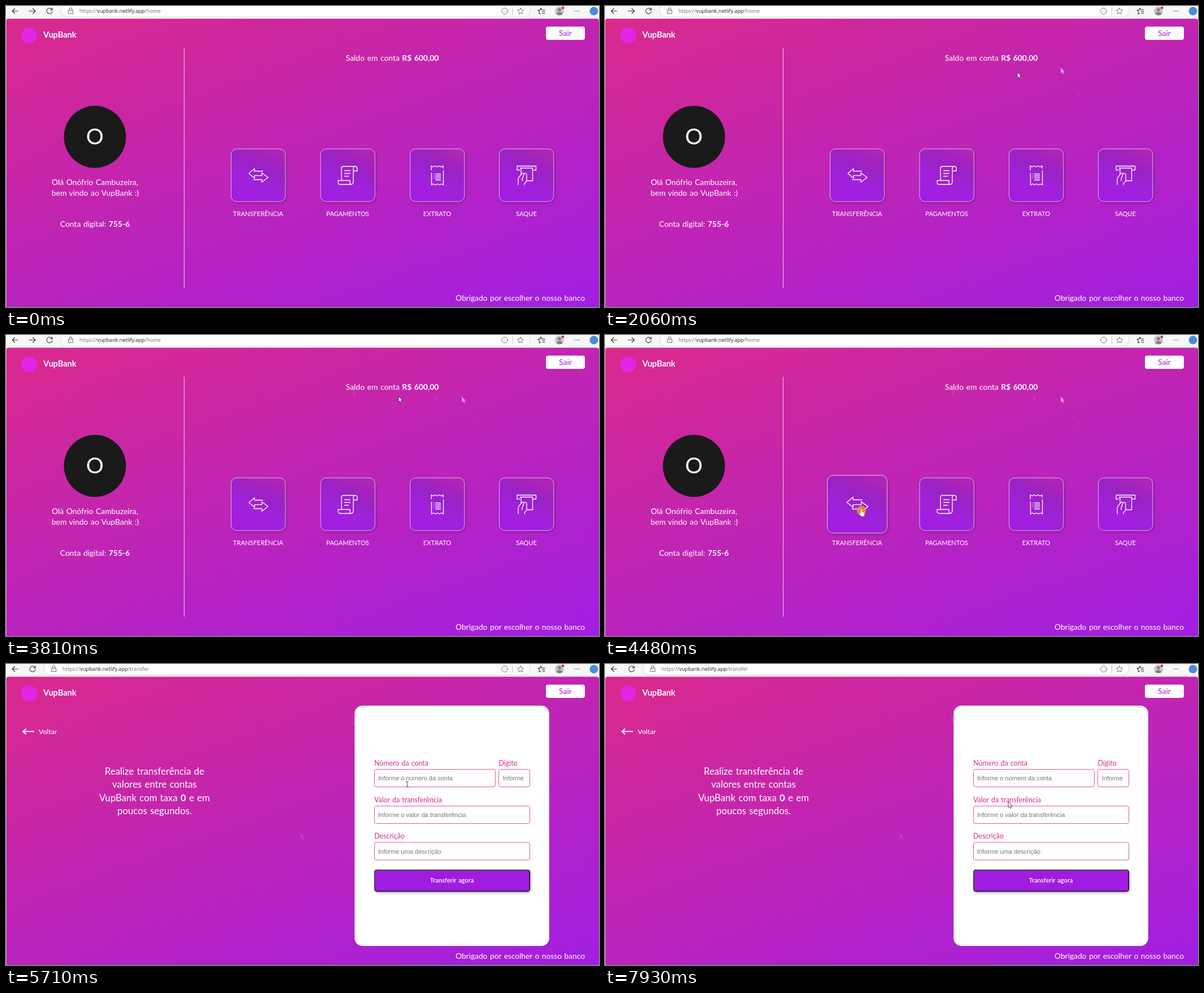
An HTML page that plays this animation: 1050 by 533 pixels, repeating every 8000 ms.

```html
<!DOCTYPE html>
<html lang="pt-BR">
<head>
<meta charset="utf-8">
<title>VupBank</title>
<style>
html, body { margin: 0; width: 100%; height: 100%; overflow: hidden; background: #f7f7f7; }
svg { display: block; width: 100%; height: 100%; }
text { font-family: Lato, sans-serif; fill: #fff; word-spacing: 1px; white-space: pre; }
.mid { text-anchor: middle; }
.b { font-weight: 700; }
.label text { font-size: 12.4px; fill: #d62a8e; }
.hint text { font: 11px "Liberation Sans", Arial, sans-serif; fill: #757575; word-spacing: 0; }
.field rect { fill: #fff; stroke: #e0569f; rx: 3px; }
.url { font: 9.2px "Open Sans", sans-serif; fill: #6b6b78; word-spacing: 0; }
.bar { fill: none; stroke: #333; stroke-width: 1.1; stroke-linecap: round; stroke-linejoin: round; }
.icon { fill: none; stroke: #fff; stroke-width: 1.3; stroke-linejoin: round; }
</style>
</head>
<body>
<svg viewBox="0 0 1050 533" xmlns="http://www.w3.org/2000/svg">
  <defs>
    <linearGradient id="bg" gradientUnits="userSpaceOnUse" x1="382" y1="-116" x2="668" y2="672">
      <stop stop-color="#da298c"/><stop offset="1" stop-color="#a11fe3"/>
    </linearGradient>
    <linearGradient id="tile" x1=".25" y1="1" x2=".7" y2="0">
      <stop stop-color="#a21fe2"/><stop offset=".4" stop-color="#a020da"/>
      <stop offset=".64" stop-color="#9923c6"/><stop offset="1" stop-color="#ae25b6"/>
    </linearGradient>
    <filter id="soft" x="-20%" y="-20%" width="140%" height="150%">
      <feDropShadow dx="1.5" dy="2" stdDeviation="2" flood-opacity=".3"/>
    </filter>
    <path id="arrow" d="M0 0V10L2.3 8L4 11.6L5.7 10.8L4.1 7.3H7Z"/>
    <path id="beam" d="M-2.5-5H-.6L0-4.4L.6-5H2.5M0-4.4V4.4M-2.5 5H-.6L0 4.4L.6 5H2.5" fill="none"/>
    <path id="hand" d="M-1 0Q0-1 1 0V4.5L4.5 5.3Q6 5.8 5.6 7.5L4.6 12H-.8L-3.6 7.6Q-3.4 6-1 7Z"/>
  </defs>

  <!-- browser bar -->
  <g class="bar">
    <path d="M21 9H11M15.5 4.5L11 9L15.5 13.5"/>
    <path id="next" d="M41 9H52M47.5 4.5L52 9L47.5 13.5"/>
    <g id="reload"><path d="M81.5 6.5A5 5 0 1 0 82 9.5M82 3.5V7H78.5"/></g>
    <rect id="pill" y="-4" height="23.5" rx="11" fill="#fff" stroke="#dcdcdc"/>
    <g id="address">
      <path d="M110.5 7.5H118.5V13.5H110.5ZM112.3 7.5V5.5a2.2 2.2 0 0 1 4.4 0V7.5M114.5 10.2V10.8" stroke="#777"/>
      <text class="url" x="130" y="12" stroke="none">https://<tspan fill="#1c1c1c">vupbank.netlify.app</tspan><tspan id="path"></tspan></text>
    </g>
    <g stroke="#777" stroke-width="1">
      <circle cx="883" cy="9" r="5.3"/>
      <path d="M880.7 9h.1M883 9h.1M885.3 9h.1"/>
      <path d="M897.5 3V15" stroke="#bbb"/>
      <path d="M911 3.5l1.7 3.5 3.8.5-2.8 2.7.7 3.8-3.4-1.8-3.4 1.8.7-3.8-2.8-2.7 3.8-.5z"/>
    </g>
    <path d="M946.5 13l-2.5 1 .6-3.8-2.6-2.6 3.6-.5 1.6-3.4 1.6 3.2M950 7h4M949 10h5M950 13h4"/>
    <g stroke="none">
      <circle cx="980" cy="9" r="8" fill="#c9c7c5"/>
      <circle cx="980" cy="6.8" r="3" fill="#85827f"/>
      <path d="M974.5 14.5Q975 10.8 980 10.8T985.5 14.5Q980 18 974.5 14.5" fill="#85827f"/>
      <circle cx="986" cy="3.2" r="2.3" fill="#d9226e"/>
      <circle cx="1041" cy="9" r="7.5" fill="#4a8bdc"/>
    </g>
    <path d="M1007.5 9h.1M1011 9h.1M1014.5 9h.1" stroke-width="1.6"/>
  </g>

  <!-- shared page frame -->
  <path d="M.5 533V26.5Q.5 22.5 4.5 22.5H1046Q1050 22.5 1050 26.5V533Z" fill="url(#bg)"/>
  <circle cx="41" cy="52" r="14" fill="#e226e6"/>
  <text class="b" x="66" y="56" font-size="14.6">VupBank</text>
  <rect x="956" y="36.5" width="69" height="23.5" rx="4" fill="#fff"/>
  <text class="mid" x="990.5" y="52.5" font-size="14" style="fill:#a11fe0">Sair</text>
  <text x="1025" y="522" font-size="13.75" text-anchor="end">Obrigado por escolher o nosso banco</text>

  <g id="home">
    <path d="M315.5 74V499" stroke="#fff" stroke-opacity=".75"/>
    <circle cx="157.5" cy="231.7" r="55" fill="#1a1a1a"/>
    <g class="mid" font-size="13.9">
      <text x="157.3" y="245" font-size="39">O</text>
      <text x="157.5" y="317">Olá Onófrio Cambuzeira,</text>
      <text x="158" y="336">bem vindo ao VupBank :)</text>
      <text x="157.5" y="390.5">Conta digital: <tspan class="b">755-6</tspan></text>
      <text x="684" y="96.5">Saldo em conta <tspan class="b">R$ 600,00</tspan></text>
    </g>
    <g id="cards"></g>
  </g>

  <g id="ghosts" fill="#fff"></g>

  <g id="transfer">
    <path d="M49 119.5H30M35 115L30 119.5L35 124" fill="none" stroke="#fff" stroke-width="1.8" stroke-linecap="round"/>
    <text x="58" y="123.5" font-size="12.2" font-weight="500">Voltar</text>
    <g class="mid" font-size="16.8">
      <text x="263" y="196">Realize transferência de</text>
      <text x="263" y="219.3">valores entre contas</text>
      <text x="263" y="242.5">VupBank com taxa <tspan class="b">0</tspan> e em</text>
      <text x="263" y="265.5">poucos segundos.</text>
    </g>
    <rect x="617.3" y="73.7" width="344.5" height="425.6" rx="14" fill="#fff"/>
    <g class="label">
      <text x="652" y="179.5">Número da conta</text><text x="872.5" y="179.5">Dígito</text>
      <text x="652" y="244.5">Valor da transferência</text><text x="652" y="309">Descrição</text>
    </g>
    <g class="field">
      <rect x="652.5" y="186.5" width="214" height="31"/><rect x="872.5" y="186.5" width="55" height="31"/>
      <rect x="652.5" y="251.5" width="275" height="31"/><rect x="652.5" y="316" width="275" height="31"/>
    </g>
    <g class="hint">
      <text x="659" y="206">Informe o número da conta</text><text x="879.5" y="206">Informe</text>
      <text x="659" y="270.5">Informe o valor da transferência</text>
      <text x="659" y="335.5">Informe uma descrição</text>
    </g>
    <g filter="url(#soft)">
      <rect x="652.7" y="364.7" width="274.6" height="37.8" rx="4" fill="#a21fe0" stroke="#111" stroke-width="1.5"/>
      <path d="M652.7 400V369Q652.7 364.7 657 364.7H925" fill="none" stroke="#4c4c4c" stroke-width="1.5"/>
    </g>
    <text class="mid" x="789.5" y="387.3" font-size="11.1" font-weight="600">Transferir agora</text>
  </g>

  <circle id="click" cx="454" cy="310.5" r="8.3" fill="#eda31c" fill-opacity=".78"/>
  <use id="cursor"/>
</svg>

<script>
const $ = id => document.getElementById(id);
const LOOP = 8000, OPEN = 4620, ROUTE = 4700;

// centre x, caption, icon outline
const cards = [
  [446.5, "TRANSFERÊNCIA", "M455 292.5H440V288L430 296.5L440 305V300.3H453V295.5L464 303.5L453 312V307.5H438"],
  [605, "PAGAMENTOS", "M594 308V288q0-4 4-4h20q4 0 4 4v4h-6M618 284q-3 0-3 4v23q0 5-5 5h-18q-4 0-4-4v-3h21v3q0 4 3 4M599 291.5h11M599 296.5h11M599 301.5h8"],
  [763.5, "EXTRATO", "M753 291v-8l3.5 2 3.5-2 3.5 2 3.5-2 3.5 2 3.5-2v5M774.5 291v26l-3.5-2-3.5 2-3.5-2-3.5 2-3.5-2-3.5 2v-22M757 297.5h1M760 297.5h10M757 301h1M760 301h10M757 304.5h1M760 304.5h10M760 308h10"],
  [921.5, "SAQUE", "M910 290.5h-5v-7h33.5v7h-5M910 287h23M912 287v11M932.5 287v22.5h-11M907 317v-10q0-3 2-5l5-6q3-1 3 2l-3 8v4M917 297l3-1q2 1 2 3v9q0 4-4 6v3"]
];
$("cards").innerHTML = cards.map(([x, name, icon], i) => `
  <g id="card${i}">
    <rect x="${x - 48}" y="253" width="96.3" height="93.3" rx="10" fill="url(#tile)" filter="url(#soft)"/>
    <rect x="${x - 48}" y="253" width="96.3" height="93.3" rx="10" fill="none" stroke="#fff" stroke-opacity=".75" stroke-width=".9"/>
    <path class="icon" d="${icon}"/>
  </g>
  <text class="mid" x="${x}" y="372" font-size="11.2">${name}</text>`).join("");

// faint trails the pointer leaves: shape, x, y, opacity, from, to
const ghosts = [
  ["arrow", 807, 109, .55, 1330, OPEN],
  ["arrow", 837, 151, .05, 1280, OPEN],
  ["arrow", 758, 107, .08, 2260, OPEN],
  ["beam", 616, 102, .22, 2750, OPEN],
  ["beam", 616, 102, .2, OPEN, LOOP],
  ["arrow", 522, 300, .12, 5200, LOOP]
];
$("ghosts").innerHTML = ghosts.map(([shape, x, y, o]) =>
  `<use href="#${shape}" x="${x}" y="${y}" opacity="${o}"${shape == "beam" ? ' stroke="#fff"' : ""}/>`).join("");

// pointer path: time, x, y
const track = [
  [790, 1000, 478], [1030, 920, 290], [1260, 837, 151], [1330, 807, 109], [1460, 770, 84], [1590, 747, 88],
  [1840, 618, 98], [2080, 738.5, 118], [2220, 765, 108], [2460, 699, 112],
  [2750, 616, 102], [3000, 640, 138], [3280, 695, 108.5], [3810, 695, 108.5],
  [4100, 560, 215], [4340, 454, 309], [4970, 454, 309],
  [5200, 523, 300], [5460, 640, 250], [5710, 710, 213],
  [5900, 780, 240], [6200, 650, 204], [6580, 692, 188],
  [6780, 704, 174], [7120, 928, 198], [7450, 903, 238],
  [7680, 810, 168], [7930, 714, 244], [8000, 714, 244]
];

const same = (a, b) => a[1] == b[1] && a[2] == b[2];
function slope(i, k) {
  const p = track[i - 1], q = track[i], n = track[i + 1];
  return !p || !n || same(p, q) || same(q, n) ? 0 : (n[k] - p[k]) / (n[0] - p[0]);
}
function pointer(t) {
  const i = Math.max(0, track.findIndex(p => p[0] > t) - 1);
  const a = track[i], b = track[i + 1], d = b[0] - a[0], u = (t - a[0]) / d;
  return [1, 2].map(k => {
    const rise = b[k] - a[k], m = slope(i, k) * d, n = slope(i + 1, k) * d;
    return a[k] + u * (m + u * (3 * rise - 2 * m - n + u * (m + n - 2 * rise)));
  });
}

const within = (x, y, l, t, r, b) => x > l && x < r && y > t && y < b;
function shapeAt(x, y, home) {
  if (home) {
    if (within(x, y, 601, 82, 767, 103)) return "beam";
    return cards.some(c => within(x, y, c[0] - 48, 253, c[0] + 48, 346)) ? "hand" : "arrow";
  }
  const field = within(x, y, 652, 186, 867, 218) || within(x, y, 872, 186, 928, 218);
  return field ? "beam" : "arrow";
}

const show = (el, on) => el.setAttribute("visibility", on ? "visible" : "hidden");

function draw(t) {
  const home = t < OPEN, routed = t >= ROUTE, shift = routed ? -30 : 0;
  $("home").style.display = home ? "" : "none";
  $("transfer").style.display = home ? "none" : "";

  show($("next"), !routed);
  $("reload").setAttribute("transform", `translate(${shift})`);
  $("address").setAttribute("transform", `translate(${shift})`);
  $("pill").setAttribute("x", 97 + shift);
  $("pill").setAttribute("width", 831 - shift);
  $("path").textContent = routed ? "/transfer" : "/home";

  const s = 1 + .1 * Math.min(1, Math.max(0, (t - 4250) / 200));
  $("card0").setAttribute("transform", `translate(446.5 299.5) scale(${s}) translate(-446.5 -299.5)`);
  show($("click"), t >= 4410 && home);
  ghosts.forEach((g, i) => show($("ghosts").children[i], t >= g[4] && t < g[5]));

  const cursor = $("cursor");
  show(cursor, t >= 790);
  if (t < 790) return;
  const [x, y] = pointer(t), shape = shapeAt(x, y, home);
  cursor.setAttribute("href", "#" + shape);
  cursor.setAttribute("transform", `translate(${x} ${y})`);
  cursor.setAttribute("fill", "#fff");
  cursor.setAttribute("stroke", shape == "hand" ? "#b9843a" : "#222");
  cursor.setAttribute("stroke-width", shape == "hand" ? .5 : .8);
}

const start = performance.now();
function tick() {
  draw((performance.now() - start) % LOOP);
  requestAnimationFrame(tick);
}
tick();
</script>
</body>
</html>
```
